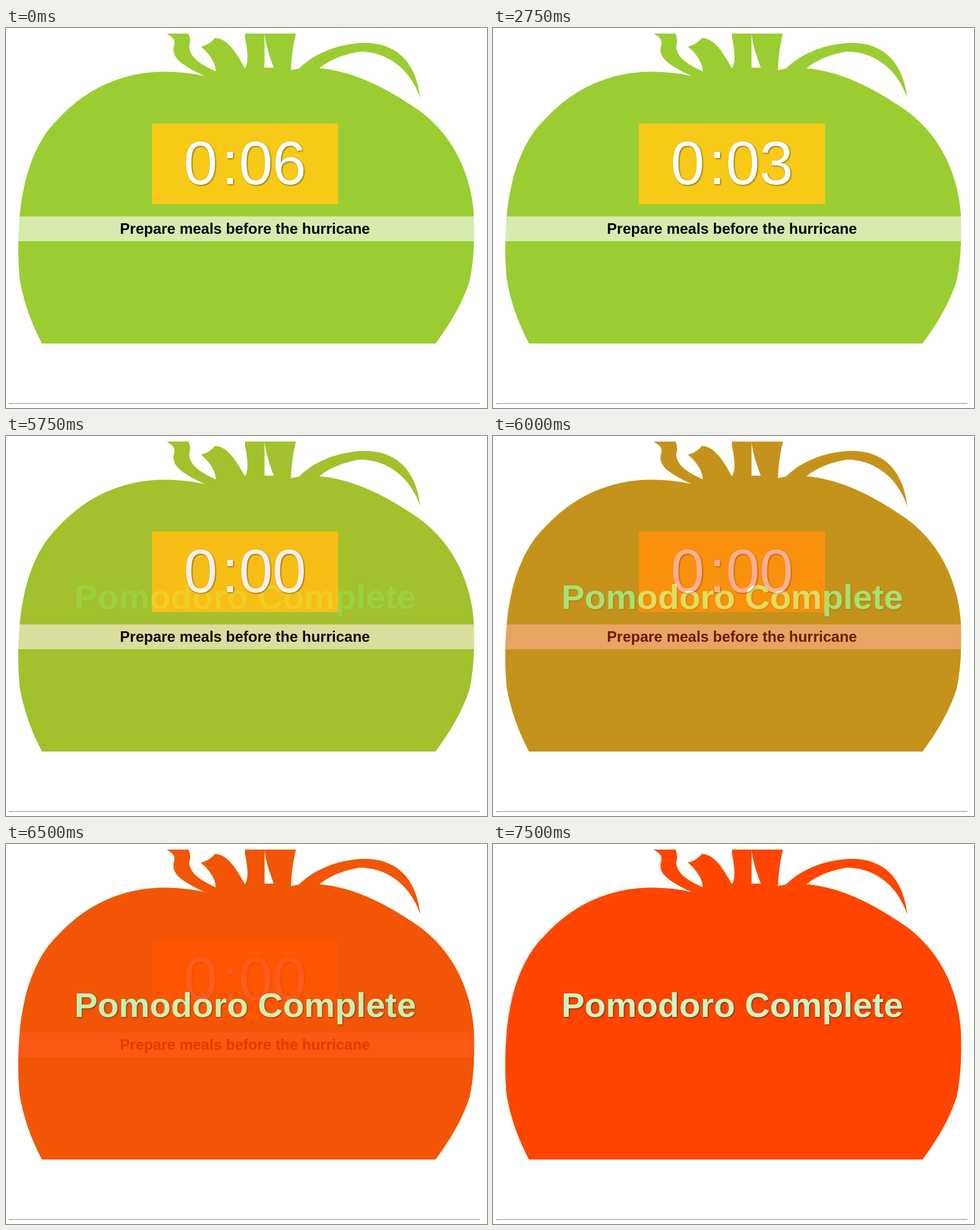
Recreate the animation shown at these times as an HTML page. Size 775 by 613 pixels, loop 8250 ms.

```html
<!DOCTYPE html>
<html lang="en">
<head>
<meta charset="utf-8">
<title>Tomato timer</title>
<style>
  html, body { margin: 0; width: 100%; height: 100%; overflow: hidden; background: #fff; }
  svg { display: block; width: 775px; height: 613px; }
  text { font-family: "Liberation Sans", Arial, sans-serif; text-anchor: middle; }
  .clock text { font-size: 98px; fill: #fff; }
  .clock .one { font: 96px Roboto, sans-serif; text-anchor: start; }
  .clock, .done text { filter: drop-shadow(1px 1px 1px rgba(0, 0, 0, .55)); }
  .task { font-size: 24px; font-weight: bold; }
  .done text { font-size: 56px; font-weight: bold; fill: #c8f7c5; }
</style>
</head>
<body>
<svg viewBox="0 0 775 613">
  <defs>
    <path id="tomato" fill-rule="evenodd" d="M58 509C40 475 28 440 22 405C19 370 19 340 22 304
      C28 235 50 180 82 149C130 96 190 70 259 70.5C280 71 300 73 320 77.5
      C290 63 264 50 271 28C273 19 270 16 259 9H294C296 14 298 20 295 30
      C297 48 312 58 338 70C338 55 326 40 314 30C325 28 331 22 337 16
      C358 17 372 42 385 65C392 55 389 35 385 15V9H467C462 30 460 48 459 68L472 65.5
      C495 42 535 25 577 24C625 24 660 50 667.5 113C650 62 610 38 570 38C545 42 520 52 505 65
      C560 70 612 96 664 132C720 172 750 235 754 304C755 340 754 375 747 408
      C736 443 715 478 692 509ZM416.5 9C419 30 425 46 431.500 64H416.500Z"/>
  </defs>
  <use href="#tomato" fill="#9acd32"/>
  <rect x="20" y="304" width="735" height="40" fill="#fff" fill-opacity=".6"/>
  <rect x="235" y="154" width="300" height="130" fill="#f7ca18"/>
  <g class="clock">
    <text x="313.500" y="252">0</text>
    <text x="361" y="252">:</text>
    <text x="402.500" y="252">0</text>
    <text id="digit" x="456.500" y="252">6</text>
    <text id="one" class="one" x="432.500" y="252">1</text>
  </g>
  <text class="task" x="385" y="332">Prepare meals before the hurricane</text>
  <g id="done" class="done" opacity="0">
    <use href="#tomato" fill="#ff4500"/>
    <text x="385.500" y="279">Pomodoro Complete</text>
  </g>
  <path d="M5 607V605H765V606H6V607Z" fill="#9a9a9a"/>
  <path d="M6 607V606H764V605H765V607Z" fill="#eee"/>
</svg>
<script>
const LOOP = 8250, STEP = 250, FADE_START = 5615, FADE_TIME = 1500;
const [digit, one, done] = ["digit", "one", "done"].map(id => document.getElementById(id));

// Same curve as CSS "ease": cubic-bezier(.25, .1, .25, 1)
function ease(p) {
  if (p <= 0) return 0;
  if (p >= 1) return 1;
  const bezier = (u, a, b) => 3 * u * (1 - u) * ((1 - u) * a + u * b) + u ** 3;
  let lo = 0, hi = 1;
  for (let i = 0; i < 24; i++) {
    const mid = (lo + hi) / 2;
    if (bezier(mid, .25, .25) < p) lo = mid; else hi = mid;
  }
  return bezier(lo, .1, 1);
}

function draw(now) {
  const t = Math.floor((now % LOOP) / STEP) * STEP;
  const left = Math.max(0, 6 - Math.floor((t + 250) / 1000));
  digit.textContent = left === 1 ? "" : left;
  one.textContent = left === 1 ? "1" : "";
  done.setAttribute("opacity", ease((t - FADE_START) / FADE_TIME));
}

const start = performance.now();
function tick() {
  draw(performance.now() - start);
  requestAnimationFrame(tick);
}
tick();
</script>
</body>
</html>
```
